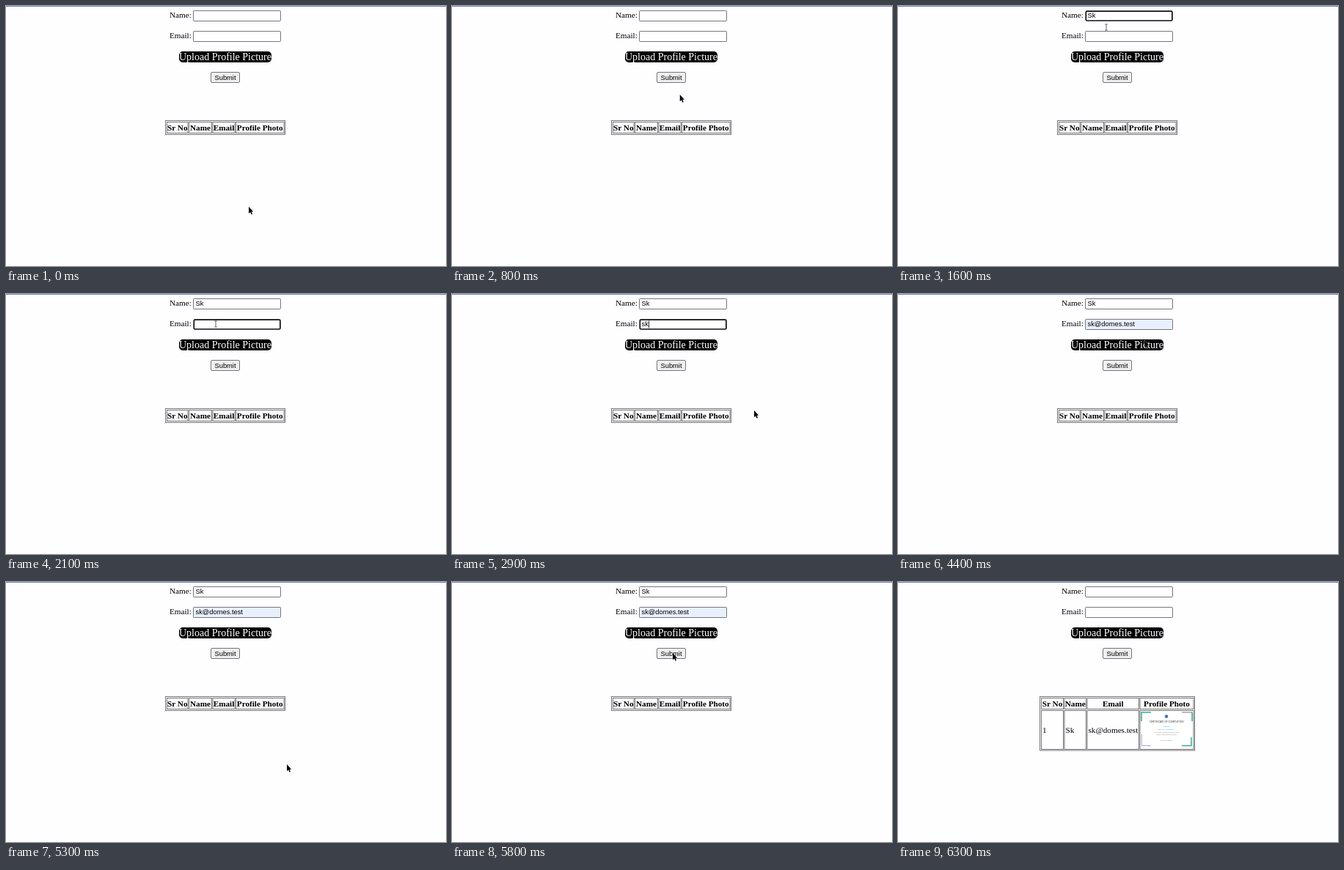
Animation, 600 px wide and 355 px high, one loop 6.4 s. Source, as an HTML page:

```html
<!DOCTYPE html>
<html lang="en">
<head>
<meta charset="utf-8">
<title>Profile form</title>
<style>
  html, body { margin: 0; width: 100%; height: 100%; overflow: hidden; background: #fefdff; }
  svg { display: block; }
  text { white-space: pre; }
  .serif { font: 11.2px "Liberation Serif", "Times New Roman", serif; }
  .bold { font-weight: bold; }
  .sans { font: 9.33px "Liberation Sans", Arial, sans-serif; }
  .mid { text-anchor: middle; }
  .line { fill: none; stroke: #767676; }
</style>
</head>
<body>
<svg id="stage" width="600" height="355" viewBox="0 0 600 355"></svg>
<script>
const LOOP = 6400, STEP = 100;
const MAIL = "sk@domes.test";
const stage = document.getElementById("stage");

function add(parent, tag, attrs, text) {
  const el = document.createElementNS("http://www.w3.org/2000/svg", tag);
  for (const k in attrs) el.setAttribute(k, attrs[k]);
  if (text) el.textContent = text;
  parent.appendChild(el);
  return el;
}
const group = (parent = stage) => add(parent, "g", {});
const label = (parent, x, y, cls, text, more) =>
  add(parent, "text", { x, y, class: cls, ...more }, text);
const box = (parent, x, y, width, height, more) =>
  add(parent, "rect", { x, y, width, height, ...more });
const path = (parent, d, more) => add(parent, "path", { d, fill: "none", ...more });
const show = (el, on) => el.setAttribute("visibility", on ? "visible" : "hidden");

// Form
box(stage, 0, 0, 600, 1, { fill: "#7088cb" });

function field(y, name) {
  label(stage, 223, y + 10.2, "serif", name);
  const frame = box(stage, 255.5, y + .5, 119, 14);
  const value = label(stage, 258.5, y + 10.2, "sans", "");
  return (text, focus, fill = "#fff") => {
    const attrs = focus
      ? { x: 256.3, y: y + 1.2, width: 117.6, height: 12.8, rx: 1.3, stroke: "#101010", "stroke-width": 1.7 }
      : { x: 255.5, y: y + .5, width: 119, height: 14, rx: .8, stroke: "#767676", "stroke-width": 1 };
    for (const k in attrs) frame.setAttribute(k, attrs[k]);
    frame.setAttribute("fill", fill);
    value.textContent = text;
  };
}
const nameField = field(6, "Name:");
const mailField = field(34, "Email:");
const caret = box(stage, 268, 36.5, .8, 10, { fill: "#000" });

box(stage, 236, 62, 126, 15, { rx: 5, fill: "#000" });
label(stage, 236, 74.2, "serif", "Upload Profile Picture", { fill: "#fff", style: "font-size:14px" });
box(stage, 279.5, 90.5, 39, 14, { rx: 1.5, fill: "#efefef", stroke: "#767676" });
label(stage, 299, 100.6, "sans mid", "Submit");

// Tables
const HEADS = ["Sr No", "Name", "Email", "Profile Photo"];

function table(left, right, bottom, cells) {
  const g = group();
  box(g, left, 156.5, right - left, bottom - 156.5, { class: "line" });
  cells.forEach(([a, b], i) => {
    box(g, a, 158.5, b - a, 15, { class: "line" });
    label(g, (a + b) / 2, 170, "serif bold mid", HEADS[i]);
  });
  return g;
}
const emptyTable = table(217.5, 380.5, 175.5, [[219.5, 248], [249.5, 280.5], [282, 312], [313.5, 379]]);
const columns = [[195.5, 225.5], [227, 256.5], [258, 328.5], [330, 403]];
const fullTable = table(193.5, 404.5, 230, columns);
columns.forEach(([a, b], i) => {
  box(fullTable, a, 175.5, b - a, 53, { class: "line" });
  label(fullTable, a + 1.5, 206, "serif", ["1", "Sk", MAIL, ""][i]);
});

// Certificate
const photo = group(fullTable);
const small = (y, size, fill, text) =>
  label(photo, 366, y, "sans mid", text, { fill, style: `font-size:${size}px` });
box(photo, 331, 176.5, 71, 51, { fill: "#fff" });
path(photo, "M332 190V178H345M401 178V190M387 223.5H400V212", { stroke: "#35ad9b", "stroke-width": 1.5 });
path(photo, "M387 178H401", { stroke: "#557", "stroke-width": .8 });
path(photo, "M332.3 208V223.5H345", { stroke: "#a9a3dc", "stroke-width": 1 });
add(photo, "circle", { cx: 366, cy: 183.5, r: 2.2, fill: "#3474b4" });
small(192, 3.15, "#333", "CERTIFICATE OF COMPLETION");
small(197.5, 1.8, "#4a84b8", "Presented to");
small(201.7, 2.5, "#3f86c6", "VENTALI MORESSA");
small(205.6, 1.7, "#777", "for successfully completing the course of study");
small(209, 1.7, "#777", "in online program design and practice");
small(217.3, 1.7, "#777", "Head of the program");

// Pointers
const arrow = path(stage, "M0 0V9.2L2.1 7.4L3.6 10.7L5 10.1L3.6 6.8H6.2Z",
  { fill: "#000", stroke: "#fff", "stroke-width": .7, "paint-order": "stroke" });
const beam = path(stage, "M-1.7 -4H1.7M0 -4V4M-1.7 4H1.7", { stroke: "#555", "stroke-width": .9 });

const track = [
  [0, 331, 274], [500, 331, 274], [900, 304, 70], [1200, 288, 14], [1400, 288, 14],
  [1600, 284, 29], [1900, 286, 41], [2200, 286, 41], [2700, 412, 159], [3600, 412, 159],
  [3900, 394.5, 156.5], [4300, 336, 63], [4400, 336, 63], [4700, 190, 175], [5000, 300, 190],
  [5200, 390, 257], [5300, 383, 249], [5700, 301, 97], [LOOP, 301, 97]
];
function pointerAt(t) {
  const i = track.findIndex(p => p[0] > t);
  const [t0, x0, y0] = track[i - 1], [t1, x1, y1] = track[i];
  const k = (t - t0) / (t1 - t0);
  return [x0 + (x1 - x0) * k, y0 + (y1 - y0) * k];
}

const typing = {
  name: [[0, ""], [1400, "S"], [1500, "Sk"], [6000, ""]],
  mail: [[0, ""], [2700, "s"], [2900, "sk"], [3200, "sk@"], [3500, MAIL], [6000, ""]]
};
const typed = (list, t) => list.filter(s => s[0] <= t).pop()[1];
const within = (t, a, b) => t >= a && t < b;

function draw(t) {
  nameField(typed(typing.name, t), within(t, 1100, 1900));
  mailField(typed(typing.mail, t), within(t, 1900, 4400), within(t, 3500, 6000) ? "#e8f0fe" : "#fff");
  show(caret, within(t, 2900, 3100));

  const done = t >= 6000;
  show(emptyTable, !done);
  show(fullTable, done);

  const overText = within(t, 1100, 2300);
  const move = `translate(${pointerAt(t)})`;
  arrow.setAttribute("transform", move);
  beam.setAttribute("transform", move);
  show(arrow, !overText && !done);
  show(beam, overText);
}

const start = performance.now();
function tick() {
  const t = (performance.now() - start) % LOOP;
  draw(Math.floor(t / STEP) * STEP);
  requestAnimationFrame(tick);
}
tick();
</script>
</body>
</html>
```
